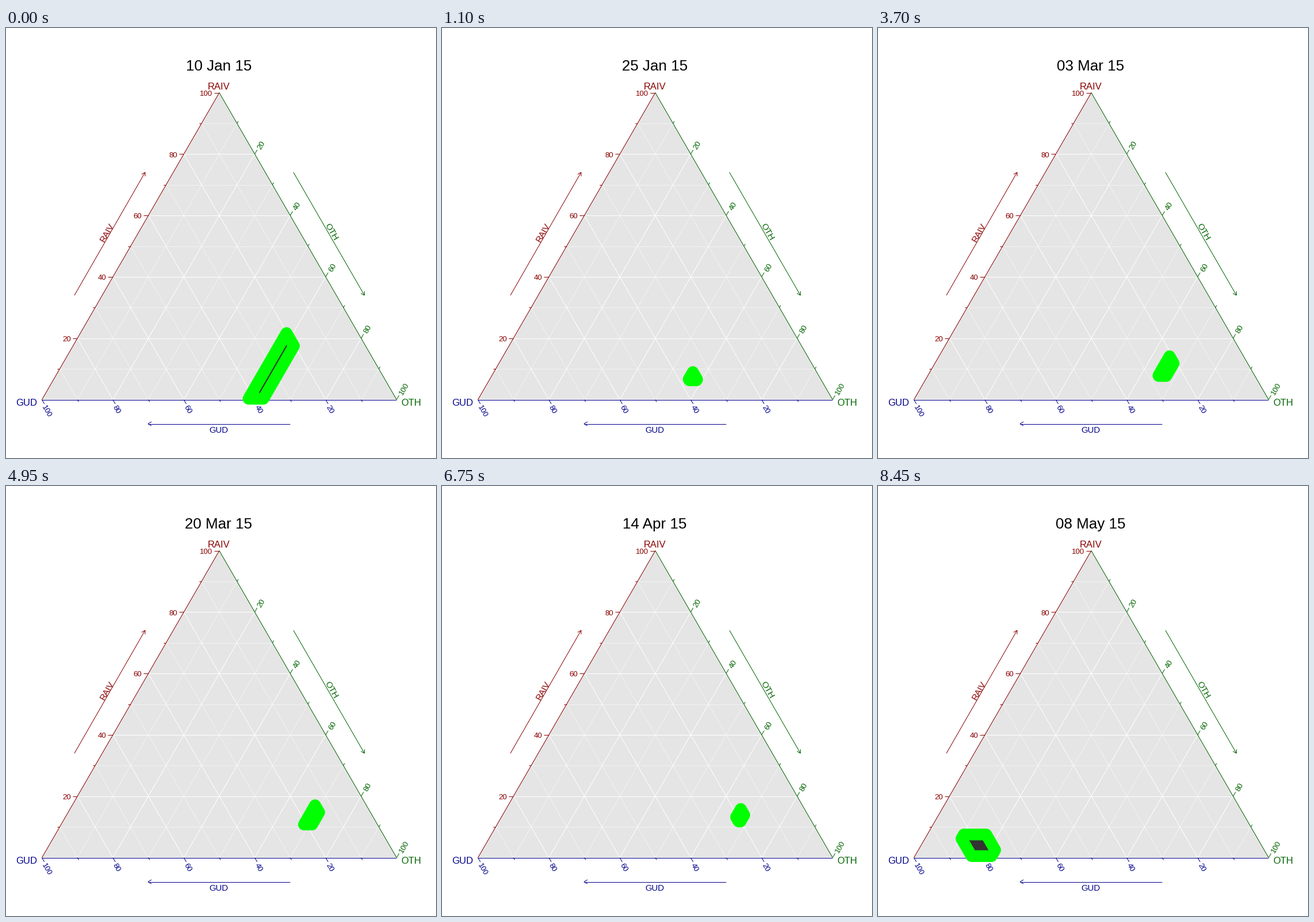
Recreate the animation shown at these times as a matplotlib script. Size 748 px wide and 748 px high, loop 10000 ms.

```python
import numpy as np
import matplotlib.pyplot as plt
from matplotlib.animation import FuncAnimation
from matplotlib.patches import Polygon

SIZE, DPI = 748, 100
PT = 72 / DPI                      # points per pixel
FRAMES, STEP_MS = 200, 50
LAST, DAYS = 169, 118
RED, GREEN, BLUE = "#8B0000", "#006400", "#00008B"
TOP, LEFT, RIGHT = "RAIV", "GUD", "OTH"
MONTHS = ("Jan", "Feb", "Mar", "Apr", "May")

plt.rcParams["font.family"] = ["Liberation Sans", "DejaVu Sans"]

# frame, then low/high limits of the top, right and left shares (per mille)
KEYS = np.array([
    (1, 3, 218, 581, 623, 202, 416),
    (22, 63, 92, 561, 585, 349, 372.5),
    (30, 60, 110, 561, 585, 325, 375),
    (51, 55.6, 69, 560.7, 571.4, 371, 382),
    (52, 55.6, 69, 560.7, 571.4, 371, 382),
    (57, 37, 175, 570, 600, 255, 385),
    (62, 60, 150, 590, 613, 260, 340),
    (76, 80, 140, 660, 683, 200, 260),
    (88, 106, 140, 660, 683, 205, 235),
    (99, 108, 171, 684.7, 707.8, 144.5, 207.4),
    (111, 130, 210, 690, 715, 100, 160),
    (121, 155, 309.5, 688.7, 706.9, 3, 157),
    (132, 127, 162, 660, 680, 178, 200),
    (150, 72.5, 143, 670.6, 689, 187.6, 237),
    (153, 70, 130, 670, 685, 205, 250),
    (166, 70, 130, 640, 660, 230, 290),
    (169, 5, 75.5, 103, 216.4, 758.5, 835),
])


def tern(top, right):
    """Stage position of a mix of shares; the left share is the rest."""
    return np.array([62.5 + 617 * (right + top / 2), 646.5 - 534 * top])


def region(limits):
    """Corners of the area where all three shares keep to their limits."""
    (t0, t1), (r0, r1), (l0, l1) = limits
    mixes = [(t, r) for t in (t0, t1) for r in (r0, r1)]
    mixes += [(t, 1 - t - s) for t in (t0, t1) for s in (l0, l1)]
    mixes += [(1 - r - s, r) for r in (r0, r1) for s in (l0, l1)]
    eps = 1e-9
    pts = np.array([tern(t, r) for t, r in mixes
                    if t0 - eps <= t <= t1 + eps and r0 - eps <= r <= r1 + eps
                    and l0 - eps <= 1 - t - r <= l1 + eps])
    dx, dy = (pts - pts.mean(axis=0)).T
    return pts[np.argsort(np.arctan2(dy, dx))]


fig = plt.figure(figsize=(SIZE / DPI, SIZE / DPI), dpi=DPI, facecolor="white")
ax = fig.add_axes([0, 0, 1, 1])
ax.set_xlim(0, SIZE)
ax.set_ylim(SIZE, 0)
ax.axis("off")


def line(a, b, color, width=1.0, z=3):
    ax.plot([a[0], b[0]], [a[1], b[1]], color=color, lw=width * PT,
            solid_capstyle="butt", zorder=z)


def label(x, y, s, size, color, angle=0, ha="center"):
    """Text whose capitals are centred on the line through (x, y)."""
    rad = np.radians(angle)
    drop = 0.36 * size
    return ax.text(x + drop * np.sin(rad), y + drop * np.cos(rad), s,
                   fontsize=size * PT, color=color, rotation=angle, ha=ha,
                   va="baseline", rotation_mode="anchor", zorder=6)


def arrow(a, b, color):
    a, b = np.array(a), np.array(b)
    line(a, b, color)
    back = np.arctan2(*(a - b)[::-1])
    for turn in (-np.pi / 6, np.pi / 6):
        barb = 7 * np.array([np.cos(back + turn), np.sin(back + turn)])
        line(b, b + barb, color)


# panel and grid
corners = [tern(1, 0), tern(0, 1), tern(0, 0)]
ax.add_patch(Polygon(corners, fc="#E5E5E5", ec="none", zorder=1))
for n in range(1, 10):
    v = n / 10
    w = 0.5 if n % 2 else 1.0
    line(tern(v, 0), tern(v, 1 - v), "white", w, 2)
    line(tern(0, v), tern(1 - v, v), "white", w, 2)
    line(tern(0, 1 - v), tern(1 - v, 0), "white", w, 2)

# axes with ticks; each: colour, place, tick direction, label offset, angle
SIDES = (
    (RED, lambda v: tern(v, 0), (-1, 0), (-11.5, 0.5), 0, "right"),
    (GREEN, lambda v: tern(1 - v, v), (0.5, -0.866), (6.7, -10), 60, "left"),
    (BLUE, lambda v: tern(0, 1 - v), (0.5, 0.866), (4, 9.8), -60, "left"),
)
for color, place, way, shift, angle, ha in SIDES:
    line(place(0), place(1), color, z=4)
    for n in range(1, 11):
        p = place(n / 10)
        line(p, p + np.array(way) * (4.5 if n % 2 else 8.5), color)
        if n % 2 == 0:
            label(*(p + shift), str(n * 10), 13.3, color, angle, ha)

label(370, 101, TOP, 16.6, RED)
label(35.5, 651.5, LEFT, 16.6, BLUE)
label(705, 651.5, RIGHT, 16.6, GREEN)

arrow((119, 465), (242, 251), RED)
arrow((500, 251), (623.5, 465), GREEN)
arrow((494, 688.5), (247, 688.5), BLUE)
label(175, 355, TOP, 15, RED, 60)
label(567, 354.5, RIGHT, 15, GREEN, -60)
label(370, 699, LEFT, 15, BLUE)

title = label(370, 64.5, "", 26, "black")
blob = Polygon(corners, closed=True, fc="#333333", ec="#00FF00",
               lw=20.4 * PT, joinstyle="round", zorder=5)
ax.add_patch(blob)


def update(i):
    k = 0 if i < 2 else min(i, LAST)
    date = np.datetime64("2015-01-10") + int(k * DAYS / LAST + 0.5)
    year, month, day = str(date).split("-")
    title.set_text(f"{day} {MONTHS[int(month) - 1]} {year[2:]}")
    limits = [np.interp(k, KEYS[:, 0], col) / 1000 for col in KEYS[:, 1:].T]
    blob.set_xy(region(np.reshape(limits, (3, 2))))
    return title, blob


anim = FuncAnimation(fig, update, frames=FRAMES, interval=STEP_MS,
                     repeat=True, repeat_delay=0)
plt.show()
```
